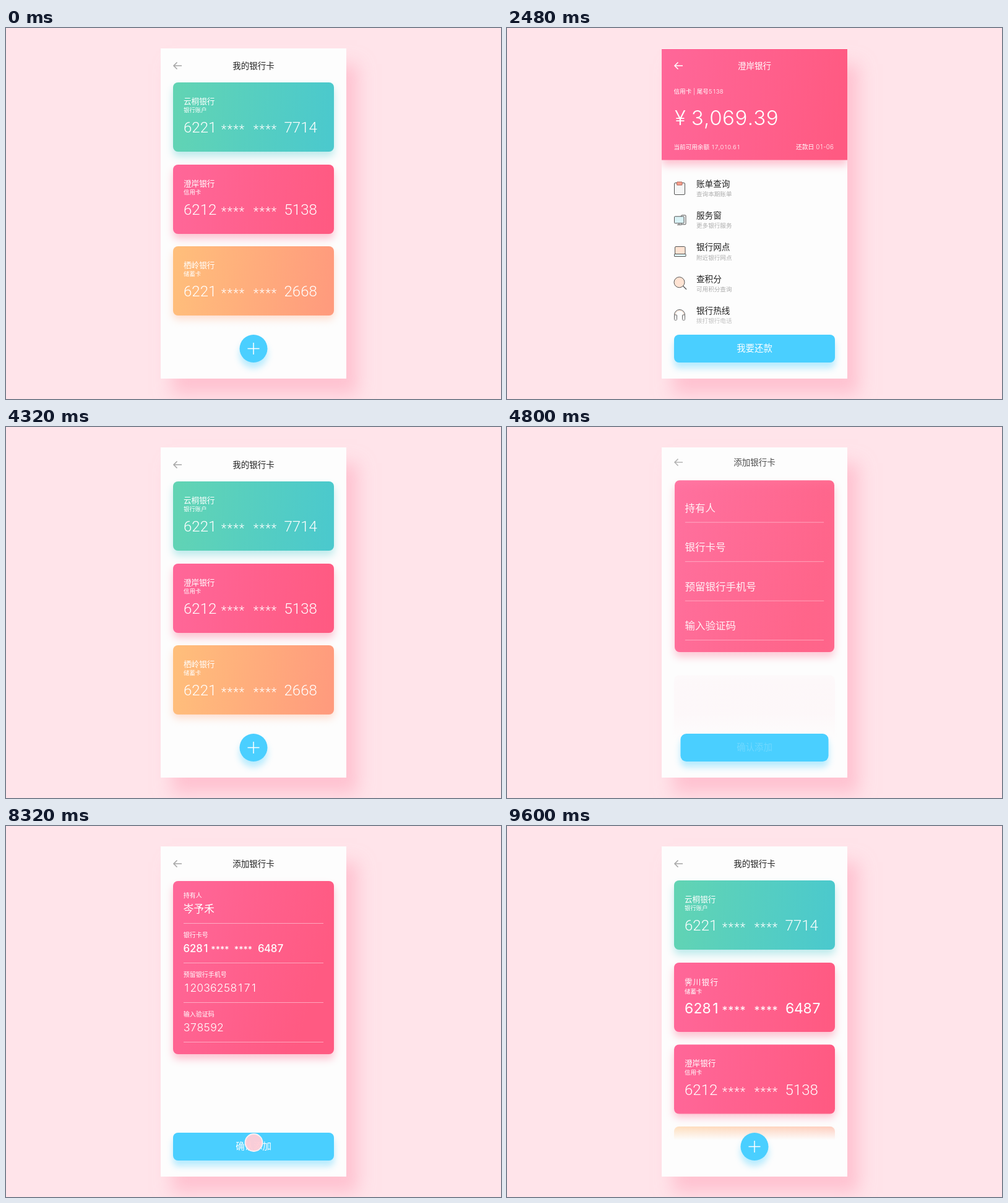
An HTML page with a canvas for the animation above (10000 ms loop, 800 by 600 pixels).

```html
<!DOCTYPE html>
<html lang="zh-CN">
<head>
<meta charset="utf-8">
<title>银行卡</title>
<style>
html, body { margin: 0; width: 100%; height: 100%; overflow: hidden; background: #ffe4ea; }
canvas { display: block; }
</style>
</head>
<body>
<canvas id="stage" width="800" height="600"></canvas>
<script>
const ctx = document.getElementById('stage').getContext('2d');
const LOOP = 10000;
const CJK = '"Noto Sans CJK SC", "Noto Sans CJK", sans-serif';
const WIDE = 'Inter, ' + CJK;
const SLIM = 'Roboto, ' + CJK;
const INK = '#222', GREY = '#adadad', LINE = '#555', BLUE = '#4acfff';
const GREEN = ['#62d4b3', '#4bc9cd', '75,201,205'];
const PINK = ['#ff6799', '#ff5a82', '255,90,130'];
const ORANGE = ['#ffbf7b', '#ff9b7d', '255,165,125'];

const cards = {
  green: { name: '云桐银行', kind: '银行账户', head: '6221', tail: '7714', paint: GREEN, dy: 0 },
  pink: { name: '澄岸银行', kind: '信用卡', head: '6212', tail: '5138', paint: PINK, dy: 0 },
  orange: { name: '栖岭银行', kind: '储蓄卡', head: '6221', tail: '2668', paint: ORANGE, dy: 0 },
  added: { name: '霁川银行', kind: '储蓄卡', head: '6281', tail: '6487', wide: true, dy: 1.5 }
};
const slimNumber = { x: 287, stars: [352, 404], pitch: 9.7, end: 449.5, size: 24, star: 20, font: SLIM, weight: 300 };
const wideNumber = { x: 287, stars: [352, 404], pitch: 9.7, end: 450, size: 23, star: 18, font: WIDE, weight: 400, tab: true };
const formNumber = { x: 286.5, stars: [335, 372.5], pitch: 7.3, end: 407, size: 16.8, star: 14, font: WIDE, weight: 500, tab: true };

const fields = [
  { label: '持有人', value: '岑予禾', start: 5560, size: 16.8 },
  { label: '银行卡号', start: 6080 },
  { label: '预留银行手机号', value: '12036258171', start: 6640, size: 17.5 },
  { label: '输入验证码', value: '378592', start: 7160, size: 17.6 }
];
const rows = [
  ['账单查询', '查询本期账单', clipboard],
  ['服务窗', '更多银行服务', computer],
  ['银行网点', '附近银行网点', laptop],
  ['查积分', '可用积分查询', lens],
  ['银行热线', '拨打银行电话', headphones]
];
const taps = [[500, 400, 277], [2500, 277, 61], [3850, 400, 512], [8050, 400.5, 512]];

const clamp = v => Math.min(1, Math.max(0, v));
const mix = (a, b, p) => a + (b - a) * p;
const ramp = (t, from, to) => clamp((t - from) / (to - from));
function ease(t, from, span = 700) {
  const u = ramp(t, from, from + span);
  return u < .5 ? 4 * u ** 3 : 1 - 4 * (1 - u) ** 3;
}

function fade(alpha, draw) {
  if (alpha <= 0) return;
  ctx.save();
  ctx.globalAlpha *= clamp(alpha);
  draw();
  ctx.restore();
}

// y is the middle of the glyphs; tab gives every digit the same width
function text(str, x, y, size, o = {}) {
  ctx.font = `${o.weight || 300} ${size}px ${o.font || WIDE}`;
  ctx.fillStyle = o.color || '#fff';
  ctx.textAlign = o.align || 'left';
  ctx.letterSpacing = (o.space || 0) + 'px';
  const base = y + size * .365;
  if (!o.tab) {
    ctx.fillText(str, x, base);
    return;
  }
  ctx.textAlign = 'center';
  for (const c of str) {
    const w = /\d/.test(c) ? size * .62 : ctx.measureText(c).width;
    ctx.fillText(c, x + w / 2, base);
    x += w;
  }
}

function box(x, y, w, h, r, fill, stroke) {
  ctx.beginPath();
  ctx.roundRect(x, y, w, h, r);
  if (fill) { ctx.fillStyle = fill; ctx.fill(); }
  if (stroke) { ctx.strokeStyle = stroke; ctx.stroke(); }
}

function line(color, width, ...pts) {
  ctx.beginPath();
  pts.forEach(([x, y]) => ctx.lineTo(x, y));
  ctx.strokeStyle = color;
  ctx.lineWidth = width;
  ctx.stroke();
}

function shadowBox(x, y, w, h, r, fill, shadow, drop, blur) {
  ctx.save();
  ctx.shadowColor = shadow;
  ctx.shadowOffsetY = drop;
  ctx.shadowBlur = blur;
  box(x, y, w, h, r, fill);
  ctx.restore();
}

function plate(x, y, w, h, [from, to, rgb], r = 8) {
  const g = ctx.createLinearGradient(x, y, x + w, y + h * .3);
  g.addColorStop(0, from);
  g.addColorStop(1, to);
  shadowBox(x, y, w, h, r, g, `rgba(${rgb},.36)`, 8, 13);
}

function number(head, tail, y, s, count = 16) {
  text(head.slice(0, count), s.x, y, s.size, s);
  for (let i = 0; i < Math.min(8, count - 4); i++) {
    const x = s.stars[i >> 2] + i % 4 * s.pitch;
    text('*', x, y + s.star * .18, s.star, { font: s.font, weight: s.weight, align: 'center' });
  }
  text(tail.slice(0, Math.max(0, count - 12)), s.end, y, s.size, s);
}

function cardText(c, bottom) {
  const y = bottom + c.dy;
  text(c.name, 287, y - 82, 12.6, { space: c.wide ? 1.2 : 0 });
  text(c.kind, 287, y - 67, 9.4);
  number(c.head, c.tail, y - 39.5, c.wide ? wideNumber : slimNumber);
}

function card(c, y) {
  plate(270, y, 260, 112, c.paint);
  cardText(c, y + 112);
}

function arrow(y, color) {
  line(color, 1.5, [276.5, y - 5.5], [271, y], [276.5, y + 5.5]);
  line(color, 1.5, [271, y], [284, y]);
}

function header(title, p) {
  fade(1 - 2 * p, () => {
    const y = 61 - 40 * p;
    arrow(y, '#a4a4a4');
    text(title, 400, y, 13.5, { color: INK, align: 'center', weight: 400 });
  });
}

// Icons are drawn around (0, 0)
function clipboard() {
  box(-8.5, -8.5, 17, 19, 1.5, '#f5f6f6', LINE);
  box(-4.5, -10, 8.5, 5, .5, '#ff9f8b', '#a5655a');
}
function computer() {
  box(2.5, -7.5, 7.5, 15, 1, '#f6f8f8', LINE);
  box(-8.5, -5.5, 15.5, 11, 1, '#d9f2f6', LINE);
  line(LINE, 1, [-1, 5.5], [-1, 8]);
  line(LINE, 1, [-4, 8], [3, 8]);
}
function laptop() {
  box(-7.5, -8, 16.5, 12, 1.5, '#ffe3d3', LINE);
  box(-8.5, 4, 18.5, 4, .5, '#e2f5f6', LINE);
}
function lens() {
  box(-9, -10, 17, 17, 8.5, '#ffe3d3', LINE);
  line(LINE, 1.2, [5.5, 4.5], [11, 10]);
}
function headphones() {
  for (const [r, color] of [[7, '#ffd9c6'], [8.5, LINE]]) {
    ctx.beginPath();
    ctx.arc(0, 0, r, Math.PI, 0);
    ctx.strokeStyle = color;
    ctx.stroke();
  }
  box(-8.5, 0, 4, 8.5, 1, '#fdfdfd', LINE);
  box(4.5, 0, 4, 8.5, 1, '#fdfdfd', LINE);
}

function detailRows(t) {
  rows.forEach(([title, note, icon], i) => {
    const p = ease(t, 1300 + 60 * i, 500) - ease(t, 2700, 300);
    fade(p, () => {
      ctx.translate(0, 252 + 51.25 * i + 30 * (1 - p));
      text(title, 306, 0, 13.6, { color: INK, weight: 400 });
      text(note, 306, 16.5, 9.6, { color: GREY });
      ctx.translate(279, 7);
      ctx.lineWidth = 1;
      icon();
    });
  });
}

function detailHead() {
  arrow(61, '#fff');
  text(cards.pink.name, 400, 61, 13.5, { align: 'center' });
  text('信用卡 | 尾号5138', 269.5, 102, 9.6, { tab: true });
  text('¥', 271, 145, 33);
  text('3,069.39', 297.5, 145, 33, { tab: true });
  text('当前可用余额 17,010.61', 269.5, 192, 9.6, { tab: true });
  text('还款日 01-06', 467, 192, 9.8, { tab: true });
}

function formFields(t) {
  fields.forEach((f, i) => {
    const y = 64 * i, up = ease(t, f.start, 200);
    const typed = ramp(t, f.start + 180, f.start + 460);
    text(f.label, 286.7, mix(134, 112, up) + y, mix(16.6, 10, up));
    if (f.value) {
      const shown = f.value.slice(0, Math.floor(f.value.length * typed));
      text(shown, 286.5, 133.5 + y, f.size, { tab: true });
    } else {
      number('6281', '6487', 133.5 + y, formNumber, Math.floor(16 * typed));
    }
    line('rgba(255,255,255,.45)', 1, [287, 157.5 + y], [513, 157.5 + y]);
  });
}

function form(t, a) {
  const shrink = ease(t, 8500);
  const enter = t < 8500 ? a : 1;
  const top = mix(89, 221, shrink), bottom = mix(369, 333, shrink);
  fade(enter, () => {
    const s = mix(.92, 1, enter);
    ctx.translate(400, 229 - 40 * (1 - enter));
    ctx.scale(s, s);
    ctx.translate(-400, -229);
    plate(270, top, 260, bottom - top, PINK);
    fade(1 - ramp(t, 8480, 8740), () => {
      box(270, top, 260, bottom - top, 8);
      ctx.clip();
      formFields(t);
    });
    fade(ramp(t, 8930, 9200), () => cardText(cards.added, bottom));
  });
}

function list(t, open, near, away) {
  const gone = near + away, seen = 1 - 1.08 * gone;
  const late = t >= 8500;
  fade(seen, () => card(cards.green, 88 - 200 * gone));
  fade(seen, () => card(cards.orange, (late ? 486 : 353) + 200 * gone));
  if (late) {
    fade(seen, () => card(cards.pink, 353.5 + 200 * away));
    return;
  }
  detailRows(t);
  fade(1 - 1.08 * away, () => {
    const x = mix(270, 250, open), drop = 200 * away;
    const top = mix(221, 34, open) + drop, bottom = mix(333, 213.5, open) + drop;
    plate(x, top, 800 - 2 * x, bottom - top, PINK, 8 * (1 - open));
    fade(1 - ramp(t, 1000, 1260) + ramp(t, 3050, 3350), () => cardText(cards.pink, bottom));
    fade(ramp(t, 1450, 1700) - ramp(t, 2750, 2950), detailHead);
  });
}

function button(t, open, away, turn) {
  const p = open + away, w = mix(45, 260, p);
  shadowBox(400 - w / 2, 496, w, 45, mix(22.5, 8, p), BLUE, 'rgba(74,207,255,.4)', 9, 11);
  fade(1 - 2.5 * turn, () => {
    ctx.translate(400, 518.5);
    if (t > 2000) ctx.rotate(-Math.PI * turn);
    line('#fff', 1.5, [-9.5, 0], [9.5, 0]);
    line('#fff', 1.5, [0, -9.5], [0, 9.5]);
  });
  const label = (str, alpha) => fade(alpha, () => text(str, 400, 518, 14.4, { align: 'center' }));
  label('我要还款', ramp(t, 1480, 1720) - ramp(t, 2750, 2950));
  label('确认添加', ramp(t, 4760, 4960) - ramp(t, 8500, 8720));
}

function tap(t, [start, x, y]) {
  const p = ramp(t, start, start + 150) - ramp(t, start + 300, start + 450);
  fade(p, () => {
    ctx.beginPath();
    ctx.arc(x, y, mix(9, 14, p), 0, 7);
    ctx.fillStyle = 'rgba(255,205,214,.96)';
    ctx.fill();
    ctx.strokeStyle = '#fff1f4';
    ctx.lineWidth = 1.8;
    ctx.stroke();
  });
}

function draw(t) {
  const open = ease(t, 1000) - ease(t, 2770);
  const near = ease(t, 945) - ease(t, 2770);
  const turn = ease(t, 945) - ease(t, 2825);
  const away = ease(t, 4304) - ease(t, 8500);

  ctx.fillStyle = '#ffe4ea';
  ctx.fillRect(0, 0, 800, 600);
  ctx.save();
  ctx.shadowColor = 'rgba(255,172,192,.6)';
  ctx.shadowOffsetX = 18;
  ctx.shadowOffsetY = 26;
  ctx.shadowBlur = 26;
  box(250, 33, 300, 534, 0, '#fdfdfd');
  ctx.restore();

  ctx.save();
  ctx.beginPath();
  ctx.rect(250, 33, 300, 534);
  ctx.clip();
  list(t, open, near, away);
  if (t > 4304) form(t, away);

  const veil = ctx.createLinearGradient(0, 463, 0, 508);
  veil.addColorStop(0, 'rgba(253,253,253,0)');
  veil.addColorStop(1, '#fdfdfd');
  ctx.fillStyle = veil;
  ctx.fillRect(250, 463, 300, 104);

  header('我的银行卡', turn + away);
  header('添加银行卡', 1 - away);
  button(t, open, away, turn + away);
  taps.forEach(p => tap(t, p));
  ctx.restore();
}

const begin = performance.now();
function tick() {
  draw((performance.now() - begin) % LOOP);
  requestAnimationFrame(tick);
}
tick();
</script>
</body>
</html>
```
